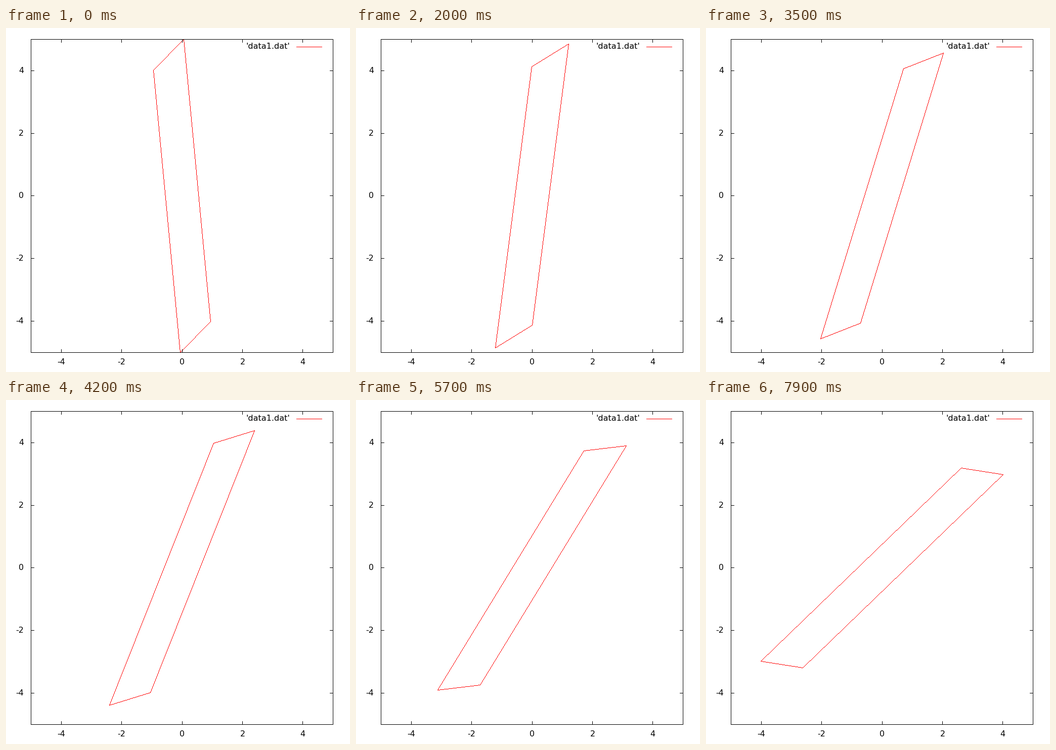
A matplotlib script that plays this animation: 680 px wide and 680 px high, repeating every 8 s.

```python
import numpy as np
import matplotlib.pyplot as plt
from matplotlib.animation import FuncAnimation
from matplotlib.collections import PolyCollection

SIZE, DPI = 680, 100
LEFT, RIGHT, TOP, BOTTOM = 49, 646, 22, 641
TIC = 6
FRAMES, INTERVAL = 80, 100
STEP = 0.01165  # clockwise turn per frame, radians
SHAPE = np.array([(0, 5), (-1, 4), (0, -5), (1, -4)])
UNIT = np.array([(0, 0), (1, 0), (1, 1), (0, 1)])


def px(x):
    return int(np.floor(348 + 59.7 * x))


def py(y):
    return 679 - int(np.floor(348 + 61.9 * y))


def segment(x0, y0, x1, y1):
    """Pixels of a crisp one-pixel line."""
    n = max(abs(x1 - x0), abs(y1 - y0)) + 1
    pts = np.column_stack([np.linspace(x0, x1, n), np.linspace(y0, y1, n)])
    return np.floor(pts + 0.5)


def squares(segments):
    pts = np.vstack([segment(*s) for s in segments])
    return pts[:, None, :] + UNIT


def add_lines(segments, color, zorder):
    lines = PolyCollection(squares(segments), facecolors=color,
                           edgecolors="none", linewidths=0, zorder=zorder)
    lines.set_snap(False)
    ax.add_collection(lines, autolim=False)
    return lines


def label(x, y, text, ha):
    ax.text(x, y, text, ha=ha, va="baseline", family="DejaVu Sans",
            fontsize=16 * 72 / DPI, color="black", zorder=3)


def outline(k):
    a = STEP * (k + 1)
    c, s = np.cos(a), np.sin(a)
    pts = [(px(c * x + s * y), py(c * y - s * x)) for x, y in SHAPE]
    return [p + q for p, q in zip(pts, pts[1:] + pts[:1])]


fig = plt.figure(figsize=(SIZE / DPI, SIZE / DPI), dpi=DPI, facecolor="white")
ax = fig.add_axes([0, 0, 1, 1])
ax.set_xlim(0, SIZE)
ax.set_ylim(SIZE, 0)
ax.axis("off")

frame = [(LEFT, TOP, RIGHT, TOP), (RIGHT, TOP, RIGHT, BOTTOM),
         (LEFT, BOTTOM, RIGHT, BOTTOM), (LEFT, TOP, LEFT, BOTTOM)]
for v in range(-4, 5, 2):
    x, y = px(v), py(v)
    frame += [(x, TOP, x, TOP + TIC), (x, BOTTOM - TIC, x, BOTTOM),
              (LEFT, y, LEFT + TIC, y), (RIGHT - TIC, y, RIGHT, y)]
    label(x + 0.5, 665, str(v), "center")
    label(35, y + 5, str(v), "right")
add_lines(frame, "black", 5)

label(561, 41, "'data1.dat'", "right")
add_lines([(574, 37, 624, 37)], "red", 4)
curve = add_lines(outline(0), "red", 4)


def update(k):
    curve.set_verts(squares(outline(k)))
    return (curve,)


anim = FuncAnimation(fig, update, frames=FRAMES, interval=INTERVAL,
                     repeat=True, repeat_delay=0, blit=False)
plt.show()
```
